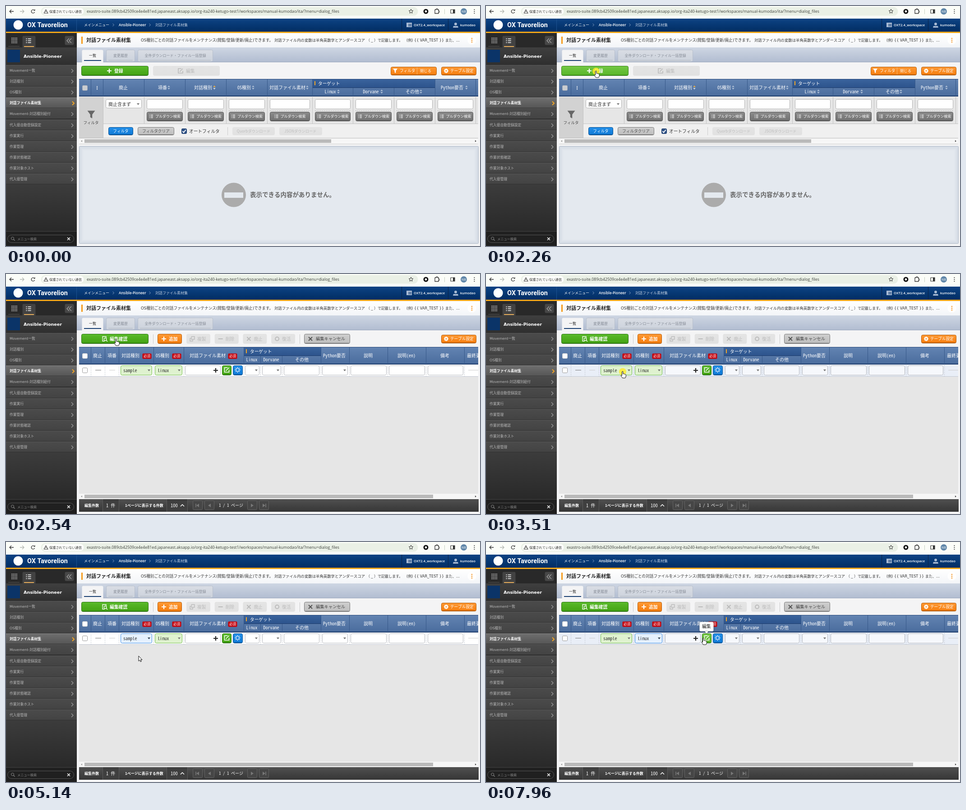
An HTML page with a canvas for the animation above (8 s loop, 1051 by 533 pixels).

```html
<!DOCTYPE html>
<html lang="ja">
<head>
<meta charset="utf-8">
<title>対話ファイル素材集</title>
<style>
html, body { margin: 0; width: 100%; height: 100%; overflow: hidden; background: #f4f4f5; }
canvas { display: block; }
</style>
</head>
<body>
<canvas id="stage" width="1051" height="533"></canvas>
<script>
const g = document.getElementById('stage').getContext('2d');
const LOOP = 8000;
const SANS = '"Noto Sans CJK JP","Noto Sans CJK",sans-serif';
const MONO = '"Noto Sans Mono CJK JP","Noto Sans CJK JP",monospace';
const WIDE = '"DejaVu Sans",' + SANS;
const LATIN = '"Open Sans","Noto Sans",' + SANS;

// ---------- helpers ----------
function grad(y1, y2, a, b) {
  const f = g.createLinearGradient(0, y1, 0, y2);
  f.addColorStop(0, a);
  f.addColorStop(1, b);
  return f;
}
function rect(x, y, x2, y2, fill) {
  g.fillStyle = fill;
  g.fillRect(x, y, x2 - x, y2 - y);
}
function box(x, y, x2, y2, fill, line, r = 3) {
  g.beginPath();
  g.roundRect(x + .5, y + .5, x2 - x - 1, y2 - y - 1, r);
  g.fillStyle = fill;
  g.fill();
  if (line) { g.strokeStyle = line; g.lineWidth = 1; g.stroke(); }
}
function disc(x, y, r, fill) {
  g.beginPath();
  g.arc(x, y, r, 0, 7);
  g.fillStyle = fill;
  g.fill();
}
function text(s, x, mid, size, color, font = SANS, weight = 400, align = 'left') {
  g.font = `${weight} ${size}px ${font}`;
  g.textAlign = align;
  g.fillStyle = color;
  g.fillText(s, x, mid + size * .37);
}
function stroke(color, width, ...lines) {
  g.strokeStyle = color;
  g.lineWidth = width;
  g.beginPath();
  for (const p of lines)
    for (let i = 0; i < p.length; i += 2) i ? g.lineTo(p[i], p[i + 1]) : g.moveTo(p[i], p[i + 1]);
  g.stroke();
}
function poly(fill, ...p) {
  g.beginPath();
  for (let i = 0; i < p.length; i += 2) g.lineTo(p[i], p[i + 1]);
  g.closePath();
  g.fillStyle = fill;
  g.fill();
}
function dash(color, ...p) {
  g.setLineDash([2, 2]);
  stroke(color, 1, p);
  g.setLineDash([]);
}
function caret(x, y, up, color = '#777') {
  const d = up ? -2 : 2;
  poly(color, x - 3, y - d, x + 3, y - d, x, y + d);
}
function chevron(x, y, color, w = 1.3, s = 4) {
  stroke(color, w, [x - s / 2, y - s, x + s / 2, y, x - s / 2, y + s]);
}
function icon(kind, x, y, c) {
  g.save();
  g.translate(x, y);
  if (kind === 'plus') stroke(c, 2.2, [-5, 0, 5, 0], [0, -5, 0, 5]);
  if (kind === 'minus') stroke(c, 2, [-5, 0, 5, 0]);
  if (kind === 'cross') stroke(c, 2.2, [-4, -4, 4, 4], [-4, 4, 4, -4]);
  if (kind === 'ring') { g.beginPath(); g.arc(0, 0, 4, 0, 7); g.lineWidth = 2; g.strokeStyle = c; g.stroke(); }
  if (kind === 'copy') stroke(c, 1.4, [-2, -5, 5, -5, 5, 1, -2, 1, -2, -5], [-3, -1, -5, -1, -5, 5, 1, 5, 1, 2]);
  if (kind === 'edit') stroke(c, 1.6, [2, -5, -5, -5, -5, 5, 5, 5, 5, 0], [-2, 2, 5, -5]);
  if (kind === 'find') {
    stroke(c, 1.3, [0, 5, -5, 5, -5, -5, 3, -5, 3, -2], [3, 3, 6, 6]);
    g.beginPath(); g.arc(1, 1, 2.8, 0, 7); g.stroke();
  }
  if (kind === 'list') for (const v of [-3, 0, 3]) { rect(-4, v - .5, -2.5, v + .7, c); rect(-1, v - .5, 4, v + .7, c); }
  if (kind === 'funnel') poly(c, -5, -5, 5, -5, 1.3, 0, 1.3, 5, -1.3, 3.5, -1.3, 0);
  if (kind === 'gear') {
    for (let i = 0; i < 4; i++) { stroke(c, 2, [-5, 0, 5, 0]); g.rotate(Math.PI / 4); }
    g.beginPath(); g.arc(0, 0, 2.7, 0, 7); g.lineWidth = 2; g.stroke();
    disc(0, 0, 1.6, '#f58a1c');
  }
  if (kind === 'burst') for (let i = 0; i < 8; i++) { stroke(c, 1.5, [2.5, 0, 6, 0]); g.rotate(Math.PI / 4); }
  g.restore();
}
function button(x, y, x2, y2, kind) {
  const [a, b, line] = {
    green: ['#5bbb2c', '#42a112', '#2a7410'],
    lit: ['#74c845', '#58b529', '#358214'],
    orange: ['#ff9a36', '#f57c0b', '#b35a06'],
    blue: ['#2390ea', '#0e78d4', '#0a5090'],
    gray: ['#cfcfcf', '#bdbdbd', '#777'],
    dark: ['#8c8c8c', '#6f6f6f', '#555'],
    off: ['#e4e4e4', '#e1e1e1', '#e3e3e3']
  }[kind];
  box(x, y, x2, y2, grad(y, y2, a, b), line);
  if (kind !== 'off') rect(x + 2, y2 - 2, x2 - 2, y2 - 1, line);
}

// ---------- page frame ----------
function browserBar() {
  rect(0, 0, 1051, 28, '#fbfdf8');
  box(77, 2, 914, 22, '#eaf0e6', null, 10);
  box(80, 4, 173, 20, '#fdfefb', null, 8);
  stroke('#333', 1.3, [8, 12, 17, 12], [12, 8, 8, 12, 12, 16]);
  stroke('#b4b8b2', 1.3, [31, 12, 40, 12], [36, 8, 40, 12, 36, 16]);
  g.beginPath(); g.arc(60, 12, 3.8, .4, 5.6); g.strokeStyle = '#333'; g.stroke();
  poly('#333', 61, 10.5, 64.5, 10.5, 64.5, 7);
  stroke('#333', 1.1, [84, 16, 88.5, 8, 93, 16, 84, 16], [88.5, 11, 88.5, 13.5]);
  text('保護されていない通信', 96, 12, 7.2, '#333');
  text('exastro-suite.089cb42509ce4e4e81ed.japaneast.aksapp.io/org-ita240-ketugo-test1/workspaces/manual-kumodao/ita/?menu=dialog_files', 179, 12, 8.8, '#3d413c', LATIN);
  const star = [];
  for (let i = 0; i <= 10; i++) {
    const a = i * Math.PI / 5 - Math.PI / 2, r = i % 2 ? 2.3 : 5;
    star.push(898 + r * Math.cos(a), 12 + r * Math.sin(a));
  }
  stroke('#333', 1, star);
  disc(931, 12, 5.5, '#111'); disc(931, 12, 2.4, '#fff');
  stroke('#333', 1.3, [951, 8, 954, 8, 954, 6.5, 957, 6.5, 957, 8, 959, 8, 959, 11, 960.5, 11, 960.5, 14, 959, 14, 959, 16.5, 951, 16.5, 951, 8]);
  rect(972, 7, 973, 18, '#c5d0c0');
  stroke('#333', 1.2, [986, 8, 995, 8, 995, 16, 986, 16, 986, 8]);
  rect(991, 8, 995, 16, '#333');
  disc(1015, 12, 7, '#5f86a8');
  text('利用', 1015, 12, 5, '#fff', SANS, 400, 'center');
  for (const y of [8, 12, 16]) disc(1038.5, y, 1.1, '#333');
}
function header() {
  rect(0, 28, 1051, 57, grad(28, 57, '#0d4384', '#012d63'));
  rect(156, 28, 157, 57, '#1d528f');
  rect(0, 57, 1051, 60, '#f0a51a');
  disc(27, 42, 10.5, '#fff');
  text('OX Tavorelion', 47, 42, 14.4, '#fff', 'Roboto,' + SANS, 700);
  text('メインメニュー', 173, 42, 8, '#fff');
  chevron(238, 42, '#8aa4c6', 1, 3);
  text('Ansible-Pioneer', 250, 42, 8, '#fff', LATIN, 600);
  chevron(319, 42, '#8aa4c6', 1, 3);
  text('対話ファイル素材集', 331, 42, 8, '#c3d0e2');
  for (const x of [877, 980]) rect(x, 28, x + 1, 57, '#0a2348');
  rect(888, 37, 900, 47, '#a9bbd4');
  for (const y of [40, 42, 44]) rect(892, y, 899, y + 1, '#1a4377');
  text('OXT2.4_workspace', 904, 42, 7.7, '#fff', LATIN, 600);
  disc(997, 40, 3, '#a9bbd4');
  poly('#a9bbd4', 991, 48, 992, 44.5, 1002, 44.5, 1003, 48);
  text('kumodao', 1007, 42, 7.4, '#fff', LATIN, 600);
}
const MENU = ['Movement一覧', '対話種別', 'OS種別', '対話ファイル素材集', 'Movement-対話種別紐付', '代入値自動登録設定',
  '作業実行', '作業管理', '作業状態確認', '作業対象ホスト', '代入値管理'];
function sidebar() {
  rect(0, 60, 157, 533, grad(60, 533, '#303030', '#1f1f1f'));
  rect(0, 396, 157, 500, grad(396, 500, '#3c3c3c', '#292929'));
  rect(0, 60, 157, 92, '#292929');
  for (let i = 0; i < 16; i++) rect(12 + i % 4 * 3.5, 70 + (i >> 2) * 3.5, 14.5 + i % 4 * 3.5, 72.5 + (i >> 2) * 3.5, '#858585');
  rect(5, 89, 30, 90, '#555');
  box(36, 66, 66, 96, '#424242');
  g.save(); g.translate(50, 77); g.scale(1.4, 1.4); icon('list', 0, 0, '#eee'); g.restore();
  rect(40, 89, 62, 91, '#e8ae5a');
  box(130, 66, 151, 87, '#474747');
  for (const x of [138, 143]) stroke('#aaa', 1.2, [x + 2, 72, x - 3, 77, x + 2, 82]);
  rect(0, 92, 157, 131, grad(92, 131, '#3f3f3f', '#2f2f2f'));
  rect(3, 97, 31, 125, '#0b3468');
  text('Ansible-Pioneer', 39, 111, 9.55, '#fff', WIDE, 700);
  MENU.forEach((s, i) => {
    const y = 131 + Math.round(i * 24.1), on = i === 3;
    rect(0, y, 157, y + 24, on ? grad(y, y + 24, '#6f6f6f', '#555') : grad(y, y + 24, '#4b4b4b', '#434343'));
    rect(0, y, 157, y + 1, on ? '#858585' : '#585858');
    rect(0, y + 23, 157, y + 24, '#303030');
    text(s, 8, y + 12, 7.8, on ? '#fff' : '#b9b9b9', WIDE, on ? 700 : 400);
    chevron(on ? 149 : 147, y + 13, on ? '#f5a623' : '#a0a0a0', on ? 2 : 1.2);
  });
  rect(0, 500, 157, 501, '#444');
  box(3, 508, 151, 526, '#202020', '#555', 9);
  g.beginPath(); g.arc(14.5, 516, 3, 0, 7); g.strokeStyle = '#888'; g.stroke();
  stroke('#888', 1.2, [16.5, 518, 19.5, 521]);
  text('メニュー検索', 25, 517, 7.2, '#8a8a8a');
  stroke('#eee', 1.6, [136, 514, 142, 520], [136, 520, 142, 514]);
}
function titleArea() {
  rect(157, 60, 1051, 533, '#f4f4f5');
  rect(157, 60, 1051, 92, grad(60, 92, '#fff', '#f3f5f8'));
  rect(167, 68, 170, 84, '#f59a1b');
  text('対話ファイル素材集', 178, 76, 11, '#222', SANS, 700);
  text('OS種別ごとの対話ファイルをメンテナンス(閲覧/登録/更新/廃止)できます。', 299, 76, 8.6, '#333', WIDE);
  text('対話ファイル内の変数は半角英数字とアンダースコア', 595, 76, 8.4, '#333', WIDE);
  text('（ _ ）で記載します。', 799, 76, 8, '#333', WIDE);
  text('(例) {{ VAR_TEST }} また、…', 888, 76, 8.1, '#333', WIDE);
  disc(1033, 76, 9.5, '#fff');
  for (const y of [72, 76, 80]) disc(1033, y, 1.2, '#f08a10');
  rect(157, 92, 1051, 124, grad(92, 124, '#ced6e3', '#b2bdd1'));
  rect(157, 124, 1051, 125, '#9aa7bd');
  for (const [x, x2, s] of [[168, 216, '一覧'], [222, 286, '変更履歴'], [292, 459, '全件ダウンロード・ファイル一括登録']]) {
    const on = x === 168;
    box(x, 97, x2, on ? 128 : 124, on ? '#f4f4f5' : grad(97, 124, '#d9dde4', '#ccd2dc'), on ? null : '#b7bfcc');
    text(s, (x + x2) / 2, 110, 8, on ? '#222' : '#858b96', SANS, 400, 'center');
    rect(x + 5, 120, x2 - 5, on ? 122 : 121, on ? '#173d70' : '#aeb4be');
  }
  rect(157, 125, 1051, 129, '#f4f4f5');
}

// ---------- shared table parts ----------
function head() {
  rect(162, 162, 1047, 200, grad(162, 200, '#6384b2', '#4a6c9d'));
  rect(162, 162, 1047, 163, '#26477a');
  rect(162, 199, 1047, 201, '#1d3c6c');
}
function columns(list, y, y2, color) {
  for (const x of list) rect(x, y, x + 1, y2, color);
}
function target(x, x2, mid, mids) {
  rect(x, 163, x2, 181, grad(163, 181, '#3a639c', '#2d548d'));
  rect(x, 181, x2, 182, '#1d3c6c');
  rect(x + 5, 167, x + 7, 176, '#f5a623');
  text('ターゲット', mid, 172, 9.7, '#fff', MONO);
  ['Linux', 'Dorvane', 'その他'].forEach((s, i) => text(s, mids[i], 190, 10, '#fff', MONO, 400, 'center'));
}
function sorter(x, y, c) {
  poly(c, x - 2.7, y - 1, x + 2.7, y - 1, x, y - 4.5);
  poly(c === '#f7b13c' ? '#d5dce6' : c, x - 2.7, y + 1, x + 2.7, y + 1, x, y + 4.5);
}
function scrollbar(y, x2) {
  rect(162, y, 1047, y + 12, '#f6f6f6');
  rect(174, y + 2, x2, y + 10, '#bababa');
  poly('#999', 166, y + 6, 169, y + 4, 169, y + 8);
  poly('#444', 1043, y + 6, 1040, y + 4, 1040, y + 8);
}
function tick(x, y, fill, line) { box(x, y, x + 12, y + 12, fill, line, 2); }

function tableSetting() {
  button(965, 135, 1043, 154, 'orange');
  icon('gear', 976, 144, '#fff');
  text('テーブル設定', 985, 144, 8.6, '#fff', SANS, 500);
}
function listTools(hover) {
  button(167, 133, 316, 155, hover ? 'lit' : 'green');
  icon('plus', 229, 144, '#fff');
  text('登録', 240, 144, 9.8, '#fff', SANS, 700);
  button(326, 133, 474, 155, 'off');
  icon('edit', 387, 144, '#bbb');
  text('編集', 399, 144, 9.8, '#bbb', SANS, 500);
  button(853, 135, 955, 154, 'orange');
  rect(911, 136, 912, 152, '#ffb56b');
  icon('funnel', 863, 144, '#fff');
  text('フィルタ', 873, 144, 8.6, '#fff', SANS, 500);
  text('閉じる', 918, 144, 8.4, '#fff', SANS, 500);
  tableSetting();
}
function listView() {
  const edge = [188, 215, 306, 397, 488, 579, 679, 769, 860, 951, 1041];
  head();
  target(679, 951, 692, [719, 809, 901]);
  columns([188, 215, 306, 397, 488, 579, 679, 951, 1041], 163, 200, '#37598a');
  columns([769, 860], 182, 200, '#37598a');
  tick(169, 176, '#c9ccd1', '#a9adb5');
  for (const y of [178, 181, 184]) rect(201, y, 203, y + 1.6, '#fff');
  text('廃止', 260, 181, 10, '#fff', MONO, 400, 'center');
  text('項番', 337, 181, 10, '#fff', MONO);
  text('対話種別', 417, 181, 10, '#fff', MONO);
  text('OS種別', 513, 181, 10, '#fff', MONO);
  text('対話ファイル素材', 584, 181, 10, '#fff', MONO);
  text('Python要否', 964, 181, 10, '#fff', MONO);
  for (const x of [361, 462, 548, 668, 1021]) sorter(x, 181, x === 462 ? '#f7b13c' : '#aebfd6');
  for (const x of [737, 833, 920]) sorter(x, 190, '#aebfd6');

  rect(162, 202, 1047, 293, '#e6e6e6');
  rect(215, 262, 1047, 293, '#f0f0f0');
  rect(215, 261, 1047, 262, '#c4c4c4');
  rect(162, 202, 215, 293, '#d2d2d2');
  columns(edge.slice(1), 202, 262, '#c2c2c2');
  rect(215, 262, 216, 293, '#c2c2c2');
  g.save(); g.translate(189, 241); g.scale(1.7, 1.7); icon('funnel', 0, 0, '#666'); g.restore();
  text('フィルタ', 188.5, 259, 8.5, '#444', SANS, 400, 'center');
  box(221, 207, 301, 227, '#fff', '#b4b4b4');
  text('廃止含まず', 227, 218, 10, '#333', MONO);
  caret(293, 218, false);
  for (let i = 2; i < 10; i++) {
    const x = edge[i] + 6, x2 = edge[i + 1] - 5, m = (x + x2) / 2;
    box(x, 207, x2, 229, '#fff', '#b4b4b4');
    dash('#aaa', x, 232.5, x2, 232.5);
    button(x, 235, x2, 256, 'dark');
    icon('list', m - 30, 245, '#fff');
    text('プルダウン検索', m - 21, 245, 8, '#fff', SANS, 500);
  }
  button(227, 269, 282, 287, 'blue');
  text('フィルタ', 254.5, 278, 8.6, '#fff', SANS, 500, 'center');
  button(292, 269, 373, 287, 'gray');
  text('フィルタクリア', 332.5, 278, 8.7, '#555', SANS, 400, 'center');
  tick(389, 272, '#2d5186', '#1f3d6b');
  stroke('#fff', 2, [391.5, 278, 394, 281, 398.5, 275]);
  text('オートフィルタ', 406, 278, 9.7, '#333', MONO);
  rect(491, 269, 492, 287, '#ccc');
  button(502, 269, 596, 287, 'off');
  text('Quorbダウンロード', 549, 278, 8.3, '#bdbdbd', SANS, 400, 'center');
  button(606, 269, 701, 287, 'off');
  text('JSONダウンロード', 653, 278, 8.3, '#bdbdbd', SANS, 400, 'center');
  rect(162, 293, 1047, 294, '#bbb');
  scrollbar(294, 721);
  rect(162, 306, 1047, 307, '#ccc');

  box(162, 311, 1048, 528, '#e4e9ef', '#aeb8c7', 1);
  for (let i = 0; i < 9; i++) {
    g.strokeStyle = `rgba(150,165,188,${.2 * (1 - i / 9)})`;
    g.strokeRect(163.5 + i, 312.5 + i, 883 - 2 * i, 214 - 2 * i);
  }
  disc(505, 419.5, 27, '#ababab');
  rect(484, 414, 526, 426, '#e4e9ef');
  text('表示できる内容がありません。', 541, 419, 13.5, '#666', SANS, 700);
}

function footer(label, n) {
  const d = label.length * 8 - 32;
  rect(162, 500, 1048, 528, grad(500, 528, '#505050', '#363636'));
  rect(214 + d, 500, 250 + d, 528, '#3f3f3f');
  rect(356 + d, 500, 402 + d, 528, '#3f3f3f');
  columns([214, 250, 356, 402].map(x => x + d), 500, 528, '#5c5c5c');
  text(label, 174, 514, 8, '#fff', SANS, 600);
  text(n + ' 件', 222 + d, 514, 10.2, '#fff', MONO);
  text('1ページに表示する件数', 264 + d, 514, 8, '#fff', SANS, 600);
  text('100', 365 + d, 514, 10.6, '#fff', MONO);
  stroke('#fff', 1.5, [387 + d, 516, 391 + d, 512, 395 + d, 516]);
  [425, 451, 546, 572].forEach((x, i) => {
    x += d;
    box(x - 11, 503, x + 11, 524, '#464646', '#626262', 2);
    const s = i < 2 ? 1 : -1;
    poly('#777', x - 3 * s, 514, x + 3 * s, 510, x + 3 * s, 518);
    if (i % 3 === 0) rect(x - 4 * s - .8, 510, x - 4 * s + .8, 518, '#777');
  });
  text(`${n} / ${n} ページ`, 472 + d, 514, 9, '#fff', MONO);
}

function loadingView(t) {
  rect(157, 129, 1051, 533, '#fafafa');
  listTools(false);
  footer('フィルタ結果件数', 0);
  rect(157, 129, 1051, 533, 'rgba(250,250,250,.5)');
  focusRing();
  const a = 1.34 + (t - 2480) / 1000 * Math.PI * 2;
  g.lineWidth = 16;
  g.strokeStyle = '#cbd4e0';
  g.beginPath(); g.arc(605, 329, 18.5, 0, 7); g.stroke();
  g.strokeStyle = '#b0bdd1';
  g.beginPath(); g.arc(605, 329, 18.5, a, a + 1.57); g.stroke();
}
function focusRing() {
  g.strokeStyle = '#5b9cf0';
  g.lineWidth = 1.6;
  g.beginPath(); g.roundRect(166, 132, 151, 24, 3); g.stroke();
}

// ---------- edit view ----------
function editTools() {
  button(167, 133, 316, 155, 'green');
  icon('find', 219, 144, '#fff');
  text('編集確認', 230, 144, 9.8, '#fff', SANS, 700);
  columns([326, 651], 134, 155, '#c9c9c9');
  button(336, 133, 390, 155, 'orange');
  icon('plus', 350, 144, '#fff');
  text('追加', 361, 144, 9.7, '#fff', SANS, 700);
  [['copy', '複製'], ['minus', '削除'], ['cross', '廃止'], ['ring', '復活']].forEach(([k, s], i) => {
    const x = 400 + i * 62.7;
    button(x, 133, x + 53, 155, 'off');
    icon(k, x + 13, 144, '#bbb');
    text(s, x + 24, 144, 9.7, '#bbb', SANS, 500);
  });
  button(661, 133, 763, 155, 'gray');
  icon('cross', 675, 144, '#555');
  text('編集キャンセル', 687, 144, 9.3, '#444', SANS, 500);
  tableSetting();
}
function badge(x) {
  box(x, 176, x + 21, 189, '#c4040e', null, 2);
  text('必須', x + 10.5, 182, 7.6, '#fff', SANS, 400, 'center');
}
function choice(x, x2, label, state) {
  const blue = state === 'focus';
  box(x, 203, x2, 225, blue ? '#e5f1fe' : '#dff2cf', blue ? '#3f8fe6' : '#72bd48');
  text(label, x + 6, 214, 10.2, '#333', MONO);
  caret(x2 - 7, 214, state === 'open', blue ? '#345' : '#777');
}
function dropdown(x, x2, label, age) {
  rect(x, 225, x2, 267, '#fff');
  stroke('#aaa', 1, [x + .5, 225, x + .5, 267, x2 - .5, 267, x2 - .5, 225]);
  box(x + 3, 227, x2 - 3, 244, '#eaf4ff', '#3d8fe8', 2);
  if (age % 1000 < 500) rect(x + 6, 230, x + 7, 241, '#333');
  rect(x + 1, 247, x2 - 1, 266, '#5897fb');
  text(label, x + 5, 256, 8.2, '#fff', MONO);
}
function field(x, x2, fill, arrow) {
  box(x, 203, x2, 225, fill, '#b4b7bd');
  if (arrow) caret(x2 - 7, 214, false);
}
function editView(t, p) {
  const inRow = p.x > 162 && p.y > 201 && p.y < 228;
  const open1 = t >= 3570 && t < 5080, open2 = t >= 5940 && t < 6870;
  const state1 = open1 ? 'open' : t >= 5080 && t < 5940 ? 'focus' : '';
  const state2 = open2 ? 'open' : t >= 6870 ? 'focus' : '';
  const tip = t >= 7840;
  editTools();
  head();
  target(527, 698, 541, [545, 588, 656]);
  columns([188, 219, 250, 327, 394, 527, 698, 761, 846, 931, 1016], 163, 200, '#37598a');
  columns([564, 612], 182, 200, '#37598a');
  tick(169, 176, '#fff', '#ccc');
  for (const [s, x] of [['廃止', 193], ['項番', 225], ['対話種別', 256], ['OS種別', 332], ['対話ファイル素材', 407],
    ['Python要否', 703], ['説明', 793], ['説明(en)', 868], ['備考', 963], ['最終更新', 1022]])
    text(s, x, 181, 10, '#fff', MONO);
  [302, 368, 492].forEach(badge);

  rect(162, 201, 1047, 228, inRow ? '#e9eef7' : '#fff');
  rect(162, 227, 1047, 228, '#c3c9d4');
  for (const x of [188, 219, 250, 327, 394, 527, 564, 612, 698, 761, 846, 931, 1016]) dash('#c0c5ce', x + .5, 202, x + .5, 227);
  tick(169, 208, '#fff', '#999');
  rect(198, 213, 211, 214, '#777');
  rect(229, 213, 242, 214, '#ccc');
  rect(1025, 213, 1047, 214, '#ccc');
  choice(254, 324, 'sample', state1);
  choice(330, 391, 'linux', state2);
  const fill = inRow ? '#f6f8fc' : '#fff';
  field(397, 476, fill);
  icon('plus', 465, 214, '#222');
  button(479, 203, 500, 225, tip ? 'lit' : 'green');
  icon('edit', 489.5, 213, '#fff');
  button(503, 203, 525, 225, 'blue');
  icon('burst', 513.5, 213, '#fff');
  for (const [x, x2, arrow] of [[530, 562, 1], [568, 610, 1], [616, 695], [701, 758, 1], [764, 844], [849, 929], [935, 1014]])
    field(x, x2, fill, arrow);
  rect(162, 228, 1047, 488, '#e6e6e6');
  if (open1) dropdown(254, 324, 'sample', t - 3570);
  if (open2) dropdown(330, 391, 'linux', t - 5940);
  scrollbar(488, 947);
  footer('編集件数', 1);
  rect(1048, 160, 1051, 533, '#f4f4f5');
  if (tip) {
    g.save();
    g.shadowColor = 'rgba(0,0,0,.4)';
    g.shadowBlur = 4;
    box(473, 177, 505, 199, '#fff', null);
    poly('#fff', 485, 198, 493, 198, 489, 203);
    g.restore();
    text('編集', 479, 187, 9.8, '#222');
  }
}

// ---------- pointer ----------
const PATH = [[900, 13, 2], [1500, 216, 148], [1680, 237, 147], [1740, 237, 147], [1860, 244, 144], [2720, 244, 144],
  [3120, 303, 223], [3350, 303, 216], [3880, 303, 216], [4270, 338, 223], [4430, 338, 223], [4670, 294, 248],
  [4800, 294, 248], [4860, 294, 253], [5180, 294, 253], [5840, 350, 217], [5940, 350, 217], [6120, 342, 268],
  [6400, 342, 268], [6460, 356, 264], [6650, 356, 264], [6710, 357, 263], [7300, 357, 263], [7960, 482, 213]];
const CLICKS = [[2260, 2320], [3510, 3570], [5840, 5940]];

function pointer(t) {
  let i = 0;
  while (i < PATH.length - 1 && PATH[i + 1][0] <= t) i++;
  const [t0, x0, y0] = PATH[i], [t1, x1, y1] = PATH[i + 1] || [t0 + 1, x0, y0];
  let k = Math.max(0, Math.min(1, (t - t0) / (t1 - t0)));
  k = k * k * (3 - 2 * k);
  return { x: x0 + (x1 - x0) * k, y: y0 + (y1 - y0) * k };
}
function inside(p, x, y, x2, y2) { return p.x >= x && p.x <= x2 && p.y >= y && p.y <= y2; }
function isHand(t, p) {
  if (inside(p, 167, 133, 316, 155)) return true;
  if (t < 2540) return false;
  return inside(p, 254, 203, 324, 225) || inside(p, 330, 203, 391, 225) || inside(p, 479, 203, 525, 225) ||
    t >= 3570 && t < 5080 && inside(p, 254, 247, 324, 267) || t >= 5940 && t < 6870 && inside(p, 330, 247, 391, 267);
}
function drawPointer(t, p) {
  if (CLICKS.some(([a, b]) => t >= a && t < b)) disc(p.x, p.y + 1, 8, 'rgba(255,235,40,.8)');
  g.save();
  g.translate(p.x, p.y);
  const shape = new Path2D(isHand(t, p)
    ? 'M-1.5 1Q0-1 1 1V6Q2.5 5 3.5 6.3Q5 5.6 5.5 7Q7.3 6.5 7.3 8.5V11Q7 13 5.7 15H-.3Q-2 12.5-4 9.5Q-3.3 7.7-1.5 9.5Z'
    : 'M0 0V11.5L2.6 9.2L4.3 13L6.2 12.2L4.6 8.5H8Z');
  g.fillStyle = '#fff';
  g.fill(shape);
  g.strokeStyle = '#111';
  g.lineWidth = 1;
  g.lineJoin = 'round';
  g.stroke(shape);
  g.restore();
}

function draw(t) {
  const p = pointer(t);
  titleArea();
  if (t < 2420) {
    listTools(t >= 900 && inside(p, 167, 133, 316, 155));
    listView();
    if (t >= 2320) focusRing();
  } else if (t < 2540) loadingView(t);
  else editView(t, p);
  browserBar();
  header();
  sidebar();
  if (t >= 900) drawPointer(t, p);
}
const start = performance.now();
function frame(now) {
  draw(Math.max(0, now - start) % LOOP);
  requestAnimationFrame(frame);
}
draw(0);
requestAnimationFrame(frame);
</script>
</body>
</html>
```
